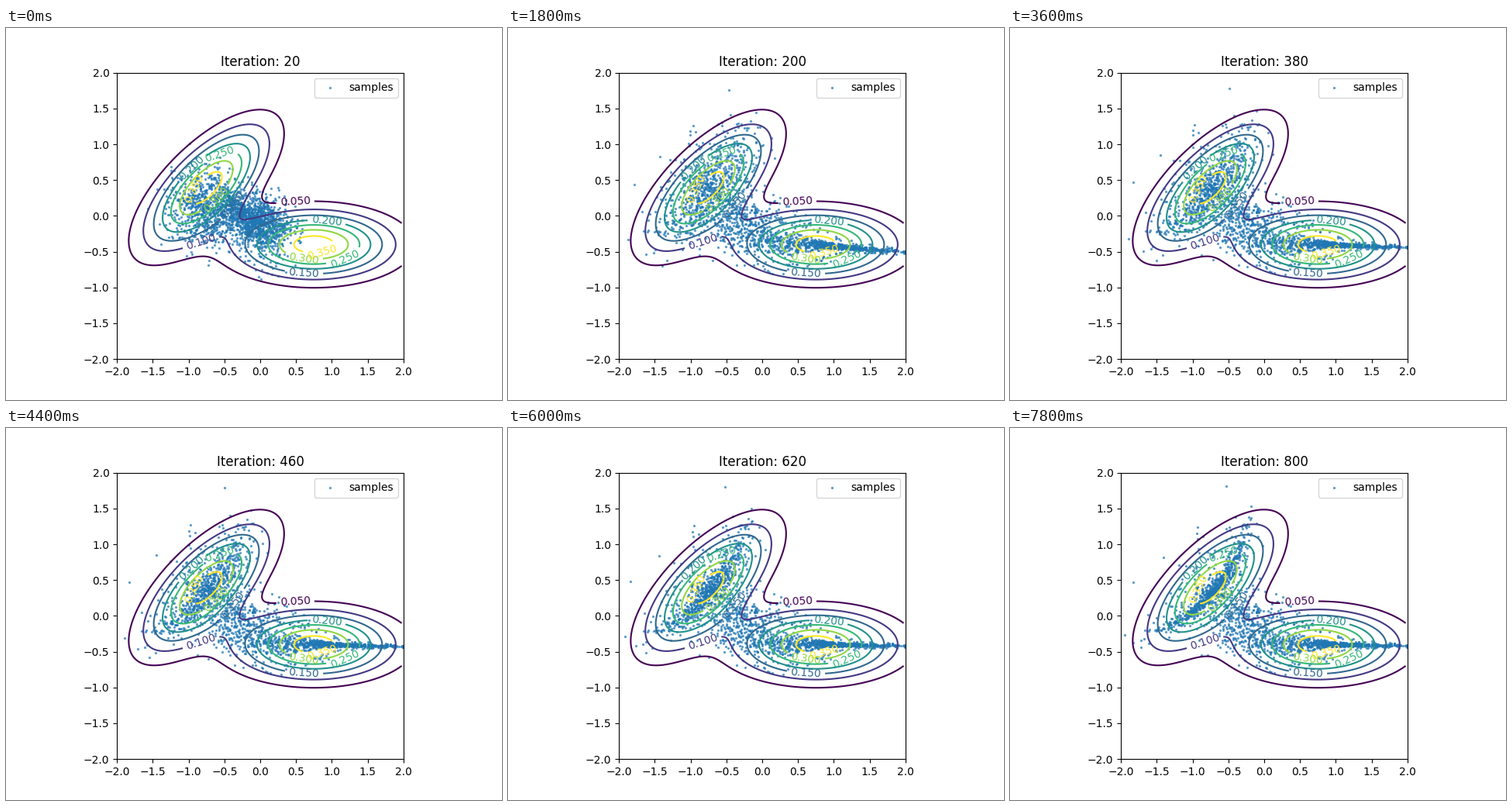
Write a matplotlib script that moves like this. It is 640 px wide and 480 px high and loops after 8000 ms.

```python
import numpy as np
import matplotlib.pyplot as plt
from matplotlib.animation import FuncAnimation

FRAMES = 40
STEP = 20
N = 2000
LEFT_MODE = np.array([-0.75, 0.4])
RIGHT_MODE = np.array([0.75, -0.4])
A, B = 0.7, 0.3  # long and short deviation of both modes

# Rough spots of the level labels, one pair per level after the first two.
LABELS = [(0.49, 0.20), (-0.83, -0.36),
          (-0.38, 0.16), (0.61, -0.81),
          (-0.96, 0.675), (0.93, -0.06),
          (-0.57, 0.86), (1.18, -0.60),
          (-0.62, 0.24), (0.61, -0.59),
          (-0.92, 0.38), (0.86, -0.505)]

rng = np.random.default_rng(7)
latent = np.clip(rng.standard_normal((2, N)), -2.8, 2.8)
zl, zr, zb = np.split(latent, [int(N * 0.40), int(N * 0.79)], axis=1)


def mix(a, b, t):
    return a + (b - a) * t


def settle(it, scale):
    """Exponential approach from 0 at the first step towards 1."""
    return 1 - np.exp((STEP - it) / scale)


def left_cloud(it):
    """Round blob that stretches along the tilted mode, then thins to a bow."""
    u, v = zl
    spread = settle(it, 35)
    age = (it - STEP) / (STEP * (FRAMES - 1))
    tail = 0.9 * age
    along = mix(0.27, 0.47, spread) * u
    across = (0.27 - 0.11 * age) * v * (1 - tail + tail * (0.2 + 0.22 * v**2))
    across += 0.05 * age * (u**2 - 1)
    ang = np.radians(mix(65, 50, spread))
    c, s = np.cos(ang), np.sin(ang)
    x = -0.72 + c * along - s * across
    y = mix(0.13, 0.42, spread) + s * along + c * across
    return np.c_[x, y]


def right_cloud(it):
    """Slides to the flat mode and narrows to a line with a fan at its left."""
    u, v = zr
    spread = settle(it, 35)
    x = mix(0.02, 0.88, spread) + mix(0.20, 0.55, spread) * u
    d = x - 0.6
    slope = -0.02 - 0.28 * (1 - settle(it, 120))
    core = mix(0.14, 0.015, settle(it, 60))
    fan = mix(0.04, 0.12, spread)
    halo = 0.6 * (np.abs(v) > 1.5) * np.exp(-(d / 0.5)**2)
    width = core + fan * (1 / (1 + np.exp(6 * d)) + halo)
    return np.c_[x, mix(-0.24, -0.39, spread) + slope * d + width * v]


def bridge_cloud(it):
    """Sheet folded below a diagonal ridge that opens to loose scatter."""
    u, v = zb
    spread = settle(it, 35)
    x = mix(-0.24, -0.20, spread) + mix(0.22, 0.30, spread) * u
    ridge = mix(-0.9, -0.2, spread) * (x + 0.2)
    depth = mix(-0.30 * np.abs(v), 0.22 * v, spread)
    return np.c_[x, ridge + depth + mix(0.13, -0.13, spread)]


def samples(it):
    return np.vstack([left_cloud(it), right_cloud(it), bridge_cloud(it)])


def lobe(x, y, centre, angle):
    dx, dy = x - centre[0], y - centre[1]
    c, s = np.cos(angle), np.sin(angle)
    u, v = (c * dx + s * dy) / A, (c * dy - s * dx) / B
    return np.exp(-0.5 * (u**2 + v**2)) / (2 * np.pi * A * B)


def density(x, y):
    return 0.5 * (lobe(x, y, LEFT_MODE, np.pi / 4) + lobe(x, y, RIGHT_MODE, 0))


fig, ax = plt.subplots(figsize=(6.4, 4.8), dpi=100)
ax.set_aspect("equal")
ax.set_xlim(-2, 2)
ax.set_ylim(-2, 2)
X, Y = np.meshgrid(*[np.arange(-2, 2, 0.025)] * 2)
lines = ax.contour(X, Y, density(X, Y), levels=0.05 * np.arange(1, 8))
fig.canvas.draw()
ax.clabel(lines, inline=True, fontsize=10, fmt="%.3f", manual=LABELS)
dots = ax.scatter(*samples(STEP).T, s=2, alpha=0.6, color="C0", label="samples")
ax.legend(loc="upper right")
title = ax.set_title("")


def update(i):
    it = STEP * (i + 1)
    dots.set_offsets(samples(it))
    title.set_text(f"Iteration: {it}")
    return dots, title


anim = FuncAnimation(fig, update, frames=FRAMES, interval=200,
                     repeat=True, repeat_delay=0)
plt.show()
```
